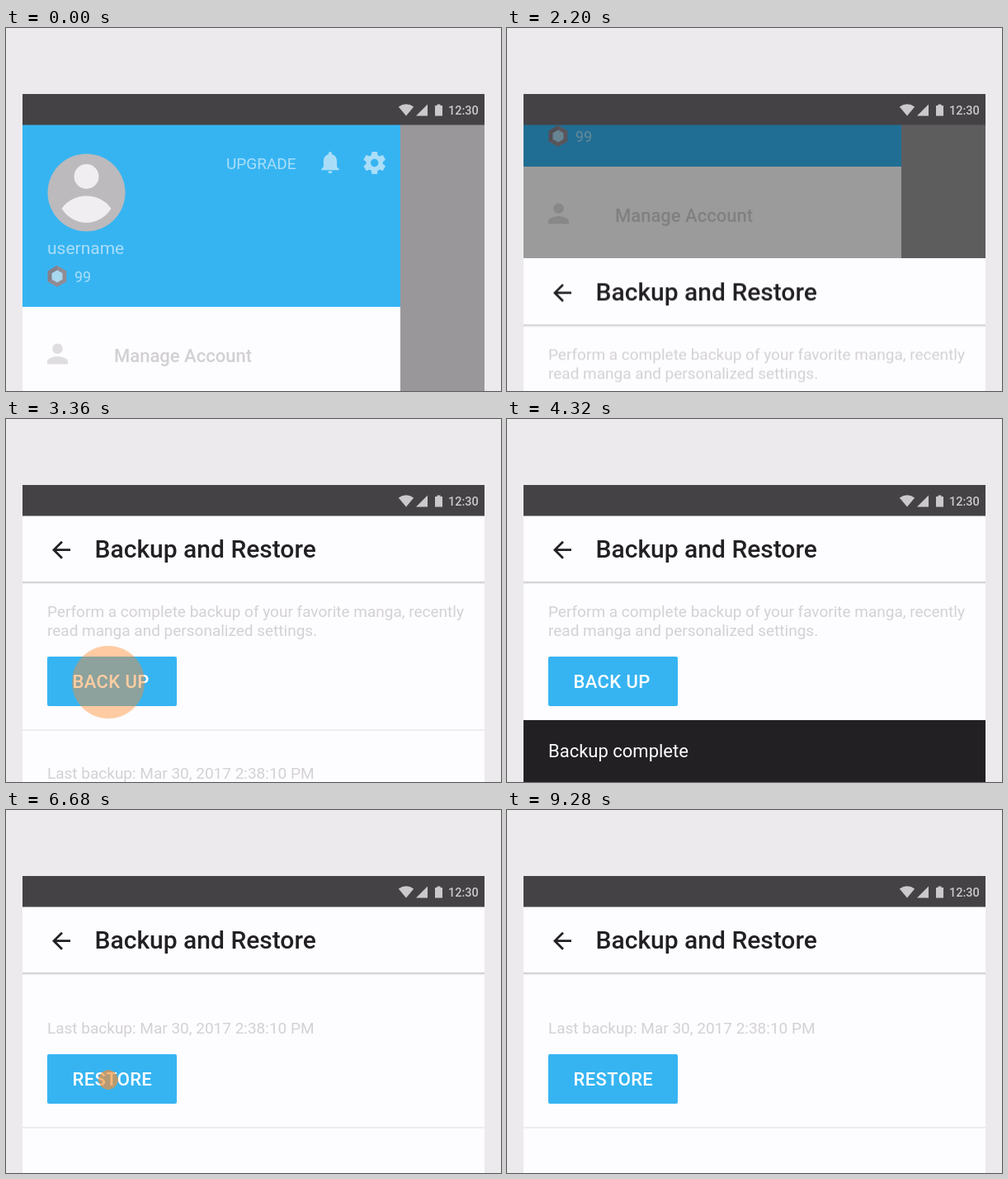
Recreate the animation shown at these times as an HTML page. Size 600 by 440 pixels, loop 9400 ms.

```html
<!DOCTYPE html>
<html lang="en">
<head>
<meta charset="utf-8">
<title>Backup and Restore</title>
<style>
  html, body { margin: 0; width: 100%; height: 100%; overflow: hidden; background: #eceaec; }
  svg { display: block; width: 600px; height: 440px; }
  text { font-family: Roboto, sans-serif; }
  .medium { font-weight: 500; }
  .row { font-size: 22px; font-weight: 500; }
  .body { font-size: 19px; fill: #d3d1d3; }
  .button { font-size: 22px; font-weight: 500; letter-spacing: .4px; fill: #fff; }
  .ink { fill: #222023; }
  .blue { fill: #36b4f2; }
  .paper { fill: #fdfcfe; }

  /* Every animation spans the whole loop: 1% = 94 ms. */
  .anim {
    animation: 9.4s linear infinite both;
    animation-timing-function: cubic-bezier(.4, 0, .2, 1);
  }
  .menu { animation-name: menu; }
  .highlight { animation-name: highlight; }
  .scrim { animation-name: scrim; }
  .page { animation-name: page; }
  .backup { animation-name: backup; }
  .restore { animation-name: restore; }
  .tap { animation-name: tap; animation-timing-function: cubic-bezier(.33, .67, .67, 1); }
  .glow { animation-name: glow; animation-timing-function: linear; fill: #ff8c2d; }
  .snack { animation-name: snack; animation-timing-function: cubic-bezier(0, 0, .2, 1); }
  .tap, .glow, .snack { animation-delay: var(--at); }

  @keyframes menu {
    0%, .43% { transform: translateY(0); }
    8.51%, 100% { transform: translateY(-170px); }
  }
  @keyframes highlight {
    0%, 11% { opacity: 0; }
    12.5%, 18% { opacity: 1; }
    19.7%, 100% { opacity: 0; }
  }
  @keyframes scrim {
    0%, 20.85% { opacity: 0; }
    28.2%, 100% { opacity: .78; }
  }
  @keyframes page {
    0%, 20.85% { transform: translateY(323px); }
    28.2%, 100% { transform: translateY(0); }
  }
  @keyframes backup {
    0%, 61.7% { transform: translateY(0); }
    68.5%, 100% { transform: translateY(-183px); }
  }
  @keyframes restore {
    0%, 61.7% { transform: translateY(0); }
    68.5%, 100% { transform: translateY(-165px); }
  }
  @keyframes tap {
    0% { transform: scale(0); }
    7.23%, 100% { transform: scale(1); }
  }
  @keyframes glow {
    0% { opacity: 0; }
    1.08%, 3.29% { opacity: .8; }
    5.75%, 100% { opacity: 0; }
  }
  @keyframes snack {
    0% { transform: translateY(75px); }
    2.66% { transform: translateY(0); }
    15.85% { transform: translateY(0); animation-timing-function: cubic-bezier(.4, 0, 1, 1); }
    18.6%, 100% { transform: translateY(75px); }
  }
</style>
</head>
<body>
<svg viewBox="0 0 600 440">
  <defs>
    <clipPath id="screen"><rect x="20" y="80" width="560" height="360"/></clipPath>
    <linearGradient id="shadow" x2="0" y2="1">
      <stop offset="0" stop-color="#bdbbbd"/>
      <stop offset=".5" stop-color="#dddbdd"/>
      <stop offset="1" stop-color="#fdfcfe"/>
    </linearGradient>
  </defs>

  <g clip-path="url(#screen)">
    <rect x="20" y="117" width="560" height="323" fill="#999799"/>

    <!-- navigation drawer -->
    <rect class="paper" x="20" y="117" width="458" height="323"/>
    <g class="anim menu">
      <rect class="blue" x="20" y="117" width="458" height="221"/>
      <circle cx="97.5" cy="199.5" r="47" fill="#bcbabc"/>
      <g fill="#f0eef0">
        <circle cx="97.5" cy="180" r="15"/>
        <path d="M67.5 219C74 209 86 203.5 97.5 203.5S121 209 127.5 219C121 229 110 236 97.5 236S74 229 67.5 219z"/>
      </g>
      <g fill="#aadef8">
        <text x="50" y="274" font-size="21">username</text>
        <text x="83" y="308" font-size="18">99</text>
        <text x="267" y="171" font-size="19">UPGRADE</text>
        <path transform="translate(376.8 146.6) scale(1.35)" d="M12 22c1.1 0 2-.9 2-2h-4c0 1.1.89 2 2 2zm6-6v-5c0-3.07-1.64-5.64-4.5-6.32V4c0-.83-.67-1.5-1.5-1.5s-1.5.67-1.5 1.5v.68C7.63 5.36 6 7.92 6 11v5l-2 2v1h16v-1l-2-2z"/>
        <path transform="translate(430.5 147.3) scale(1.35)" d="M19.43 12.98c.04-.32.07-.64.07-.98s-.03-.66-.07-.98l2.11-1.65c.19-.15.24-.42.12-.64l-2-3.46c-.12-.22-.39-.3-.61-.22l-2.49 1c-.52-.4-1.08-.73-1.69-.98l-.38-2.65C14.46 2.18 14.25 2 14 2h-4c-.25 0-.46.18-.49.42l-.38 2.65c-.61.25-1.17.59-1.69.98l-2.49-1c-.23-.09-.49 0-.61.22l-2 3.46c-.13.22-.07.49.12.64l2.11 1.65c-.04.32-.07.65-.07.98s.03.66.07.98l-2.11 1.65c-.19.15-.24.42-.12.64l2 3.46c.12.22.39.3.61.22l2.49-1c.52.4 1.08.73 1.69.98l.38 2.65c.03.24.24.42.49.42h4c.25 0 .46-.18.49-.42l.38-2.65c.61-.25 1.17-.59 1.69-.98l2.49 1c.23.09.49 0 .61-.22l2-3.46c.12-.22.07-.49-.12-.64l-2.11-1.65zM12 15.5c-1.93 0-3.5-1.57-3.5-3.5s1.57-3.5 3.5-3.5 3.5 1.57 3.5 3.5-1.57 3.5-3.5 3.5z"/>
      </g>
      <g transform="translate(62 301)">
        <path fill="#918b94" d="M0-13L11.3-6.5V6.5L0 13L-11.3 6.5V-6.5z"/>
        <path fill="#857f89" d="M0-13V0L-11.3 6.5V-6.5z"/>
        <path fill="#a8d8ee" d="M0-7.5L6.5-3.75V3.75L0 7.5L-6.5 3.75V-3.75z"/>
      </g>

      <path fill="#dfdde0" transform="translate(43.75 376.2) scale(1.5625)" d="M12 12c2.21 0 4-1.79 4-4s-1.79-4-4-4-4 1.79-4 4 1.79 4 4 4zm0 2c-2.67 0-8 1.34-8 4v2h16v-2c0-2.66-5.33-4-8-4z"/>
      <text class="row" x="131" y="405" fill="#d2d0d2">Manage Account</text>

      <rect class="anim highlight" x="20" y="430" width="458" height="75" fill="#f5f4f6"/>
      <path fill="#727073" transform="translate(45 449) scale(1.5)" d="M19.35 10.04C18.67 6.59 15.64 4 12 4 9.11 4 6.6 5.64 5.35 8.04 2.34 8.36 0 10.91 0 14c0 3.31 2.69 6 6 6h13c2.76 0 5-2.24 5-5 0-2.64-2.05-4.78-4.65-4.96zM14 13v4h-4v-4H7l5-5 5 5h-3z"/>
      <text class="row ink" x="131" y="475">Back up &amp; Restore</text>
    </g>
    <g transform="translate(249.5 297.5)" style="--at: 1.033s">
      <g class="anim tap"><circle class="anim glow" r="52"/></g>
    </g>

    <rect class="anim scrim" x="20" y="117" width="560" height="323"/>

    <!-- backup page -->
    <g class="anim page">
      <rect class="paper" x="20" y="117" width="560" height="323"/>
      <g class="anim backup">
        <text class="body" x="50" y="240">Perform a complete backup of your favorite manga, recently</text>
        <text class="body" x="50" y="263">read manga and personalized settings.</text>
        <rect class="blue" x="50" y="288" width="157" height="60" rx="2"/>
        <text class="button" x="80.5" y="325.5">BACK UP</text>
        <rect x="20" y="376" width="560" height="2" fill="#eeecee"/>
      </g>
      <g class="anim restore">
        <text class="body" x="50" y="436">Last backup: Mar 30, 2017 2:38:10 PM</text>
        <rect class="blue" x="50" y="461" width="157" height="60" rx="2"/>
        <text class="button" x="80.5" y="498.5">RESTORE</text>
        <rect x="20" y="549" width="560" height="2" fill="#eeecee"/>
      </g>
      <rect x="20" y="196.500" width="560" height="4" fill="url(#shadow)"/>
      <rect class="paper" x="20" y="117" width="560" height="80"/>
      <path class="ink" transform="translate(50.5 142.2) scale(1.375)" d="M20 11H7.83l5.59-5.59L12 4l-8 8 8 8 1.41-1.41L7.83 13H20v-2z"/>
      <text class="medium ink" x="107.500" y="168" font-size="30">Backup and Restore</text>
    </g>
    <g transform="translate(124 319)" style="--at: 2.947s">
      <g class="anim tap"><circle class="anim glow" r="52"/></g>
    </g>
    <g transform="translate(124 327)" style="--at: 6.6s">
      <g class="anim tap"><circle class="anim glow" r="52"/></g>
    </g>

    <!-- snackbars -->
    <g class="anim snack" style="--at: 3.855s">
      <rect class="ink" x="20" y="365" width="560" height="75"/>
      <text x="50" y="410" font-size="22" fill="#fff">Backup complete</text>
    </g>
    <g class="anim snack" style="--at: 7.515s">
      <rect class="ink" x="20" y="365" width="560" height="75"/>
      <text x="50" y="410" font-size="22" fill="#fff">Restore complete</text>
    </g>

    <!-- status bar -->
    <rect x="20" y="80" width="560" height="37.500" fill="#444244"/>
    <g fill="#cbc9cb">
      <path d="M485 106.500L475.800 95.500Q485 89 494.200 95.500z"/>
      <path d="M511 92.500V106.500H497z"/>
      <path d="M520 94H522.500V92.500H526.500V94H529V106.500H520z"/>
      <text class="medium" x="536" y="104.500" font-size="14.500">12:30</text>
    </g>
  </g>
</svg>
</body>
</html>
```
